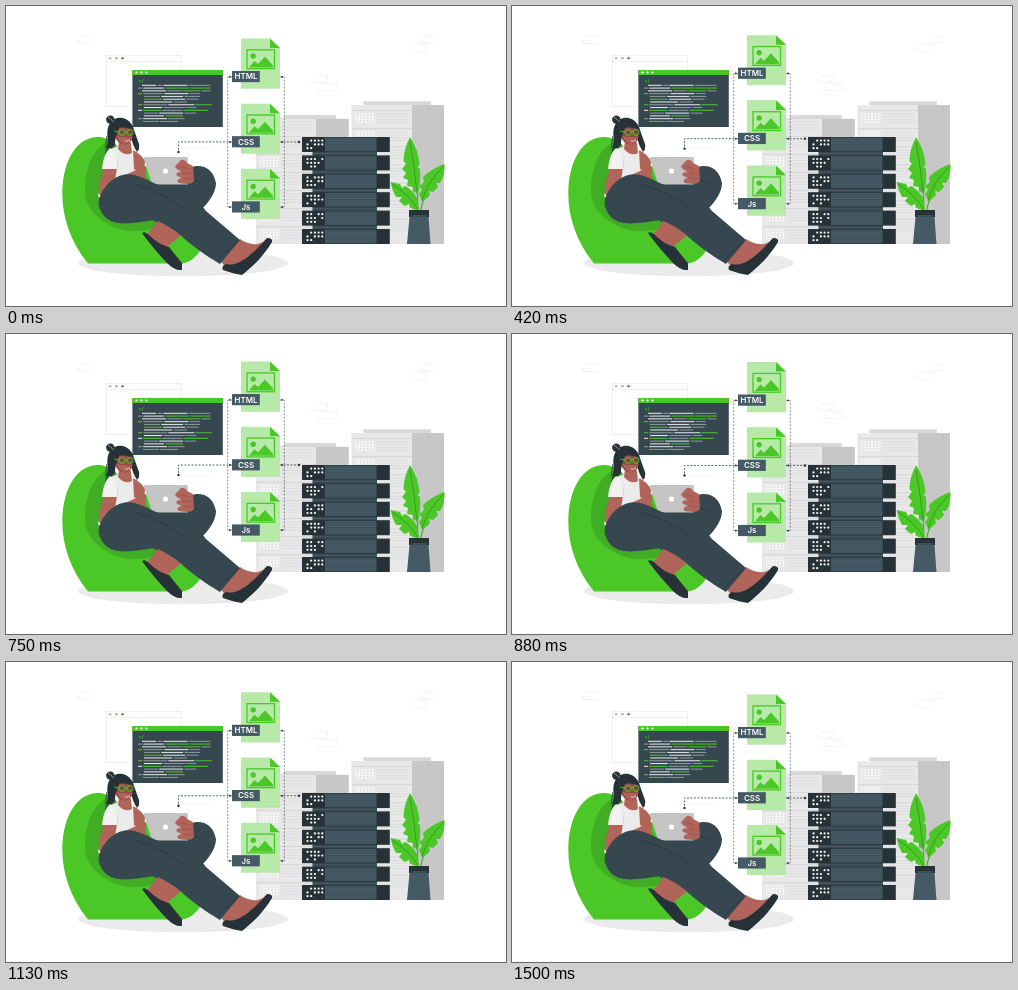
These frames come from a looping animation (500 px wide and 300 px high, 1540 ms). An HTML page with a canvas:

```html
<!DOCTYPE html>
<html lang="en">
<head>
<meta charset="utf-8">
<title>Web files</title>
<style>
html, body { margin: 0; width: 100%; height: 100%; overflow: hidden; background: #fff; }
canvas { display: block; width: 500px; height: 300px; }
</style>
</head>
<body>
<canvas id="stage"></canvas>
<script>
const LOOP = 1540;
const GREEN = '#4bc828', LEAF_DARK = '#40ad24', PALE = '#b7e9a9';
const INK = '#263238', NAVY = '#37474f', SLATE = '#455a64';
const SKIN = '#b16459', SKIN_DARK = '#8f4b44';

const canvas = document.getElementById('stage');
const ctx = canvas.getContext('2d');
const ratio = window.devicePixelRatio || 1;
canvas.width = 500 * ratio;
canvas.height = 300 * ratio;

function rect(x, y, w, h, color) {
  ctx.fillStyle = color;
  ctx.fillRect(x, y, w, h);
}
function frame(x, y, w, h, color, width = 0.6) {
  ctx.strokeStyle = color;
  ctx.lineWidth = width;
  ctx.strokeRect(x, y, w, h);
}
function dot(x, y, r, color) {
  ctx.fillStyle = color;
  ctx.beginPath();
  ctx.arc(x, y, r, 0, Math.PI * 2);
  ctx.fill();
}
function oval(x, y, rx, ry, color) {
  ctx.fillStyle = color;
  ctx.beginPath();
  ctx.ellipse(x, y, rx, ry, 0, 0, Math.PI * 2);
  ctx.fill();
}
function shape(path, color) {
  ctx.fillStyle = color;
  ctx.fill(new Path2D(path));
}
function line(path, color, width = 0.6, dash = []) {
  ctx.strokeStyle = color;
  ctx.lineWidth = width;
  ctx.setLineDash(dash);
  ctx.stroke(new Path2D(path));
  ctx.setLineDash([]);
}

function drawBackdrop() {
  const faint = '#ececec';
  line('M74 30.5H86.5V37.5H71V34.5H75', faint);
  line('M418 30.5H430V37H415V34H419 M407 38H420V45H404V42H408', faint);
  line('M309 69.5H321.5V76H306V73 M315 77.5H331V84.5H312V80.5', faint);
  frame(176, 135, 29.5, 7, '#ededed');
  oval(177, 257, 105, 13.3, '#ebebeb');
}

function drawWindows() {
  frame(100.3, 49.3, 75.3, 51.5, '#e5e5e5');
  line('M100 55.5H176', '#e5e5e5');
  ['#b9b9b9', '#a8b2a6', '#4f9b42'].forEach((c, i) => dot(104.2 + i * 6.2, 52.3, 1.3, c));

  rect(126.4, 64, 90.4, 57, NAVY);
  rect(126.4, 64, 90.4, 5, GREEN);
  for (let i = 0; i < 3; i++) dot(130.5 + i * 5, 66.5, 1.1, '#fff');
  ctx.fillStyle = GREEN;
  ctx.font = '600 4.5px "Noto Sans Mono", monospace';
  ctx.textAlign = 'left';
  ctx.fillText('</', 132.5, 76.7);

  // Each row: start x, then widths and ink letters of its words.
  const rows = [
    [136, '14w 5e 24w 22e'], [132, '4e 21w 24g 20g'], [136, '24w 14e 18g 9e'],
    [132, '4g 20e 24w 10e'], [138, '16e 22w 16e'], [138, '18g 22w 12e'],
    [138, '28w 14e'], [132, '4g 24e 26w 16g'], [138, '18w 22e 10g'],
    [132, '4w 18g 20e 24g'], [138, '14e 24w 12e'], [138, '20w 18g'],
    [132, '4e 24w 16e'], [137, '16g 18e']
  ];
  const inks = { w: '#e8ebec', e: '#8e9a9f', g: GREEN };
  rows.forEach(([x, words], i) => {
    for (const word of words.split(' ')) {
      const w = parseInt(word);
      rect(x, 78.8 + i * 2.78, w, 1, inks[word.at(-1)]);
      x += w + 1.2;
    }
  });
}

function dotGrid(x, y) {
  rect(x, y, 18, 9, '#f7f7f7');
  for (let c = 0; c < 5; c++)
    for (let r = 0; r < 3; r++) dot(x + 2 + c * 3.4, y + 1.8 + r * 2.7, 0.95, '#d9d9d9');
}

function lightServer(x, y, front, side, rowY) {
  rect(x, y, front, 238 - y, '#e8e8e8');
  rect(x + front, y, side, 238 - y, '#c7c7c7');
  for (let top = rowY; top < 228; top += 18.1) {
    line(`M${x} ${top - 3}h${front}`, '#d3d3d3', 0.9);
    dotGrid(x + 4, top);
    for (let i = 0; i < 4; i++)
      line(`M${x + 25} ${top + 0.5 + i * 2.7}h${front - 29}`, '#d6d6d6', 0.6);
  }
}

function drawServers() {
  rect(357.5, 95.3, 67.5, 4, '#d9d9d9');
  lightServer(345.5, 99, 60.5, 32, 107.5);
  rect(278, 109, 52, 4, '#d9d9d9');
  lightServer(250, 112.8, 60, 32.8, 115.2);

  rect(306.5, 131, 64.5, 106.5, NAVY);
  for (let i = 0; i < 6; i++) {
    const y = 131 + i * 18.4;
    rect(296, y, 87.8, 15, INK);
    rect(319, y + 0.7, 51.5, 13.6, SLATE);
    for (let k = 0; k < 5; k++) line(`M320 ${y + 2.2 + k * 2.6}h50`, '#3a4d56', 0.6);
    for (let k = 0; k < 13; k++) {
      const col = k % 5, row = Math.floor(k / 5);
      if ((col * 3 + row * 2 + i) % 5) dot(301.5 + col * 3.7, y + 3.6 + row * 3.8, 1.1, '#fff');
    }
    if (i < 5) line(`M307 ${y + 16.7}h64`, '#596b73', 0.6);
  }
}

function drawPlant() {
  line('M412 207Q412 170 405 140 M414 207Q417 190 431 168 M412 207Q407 192 390 183', LEAF_DARK, 1.2);
  shape('M404 131C409 139 413 148 413.5 158L411.5 161L414 163Q415 178 412 188L407 185L407 181L401 180L402 174L397 172L400 167L396 163L400 158L397.5 155Q398 142 404 131Z', GREEN);
  shape('M438.5 158C439 166 437 173 434 177L430 177L432 181L427 186L423 185L424 189Q420 194 416 195L413 188L416 184L413.5 180L418 176L417 171Q426 162 438.5 158Z', GREEN);
  shape('M384.5 176L394 178L396 182L399 180Q407 184 411 192Q413 199 412 204L404 202L403 198L399 200L393 195L396 191L390 191Q386 184 384.5 176Z', GREEN);
  line('M404 136Q409 163 411 187 M437 161Q421 176 416 195 M386 178Q401 187 412 203', '#2f8a1a', 0.7);
  shape('M403.5 211H422.5L424.5 238H401Z', SLATE);
  rect(403, 204, 20, 7, INK);
  rect(405, 209.3, 16, 1.4, SLATE);
}

function drawSeat() {
  shape('M82 257.5C65 237 56 211 56.3 187C57 152 72 131 92 131C104 131 110 139 116 147L181 184C202 207 203 233 198 239Q187 258 174 257.5Z', GREEN);
  shape('M106 134C91 138 80 156 79 181C78 202 91 214 111 222C128 229 153 224 169 213L140 170L116 146Z', LEAF_DARK);
}

function drawBackLeg() {
  shape('M139 180C159 176 177 163 190 160Q206 159 210 177C210 188 201 198 194 205L166 228L147 214Z', NAVY);
  line('M188 174Q198 177 205 186', INK, 0.6);
  shape('M152 214L177 228L162 240L172 253Q160 249 141 229Z', SKIN);
  shape('M136 227Q139 225 143 229C150 236 156 239 163 241Q170 250 176 257L176 264Q169 265 161 257Q146 241 136 227Z', INK);
}

function drawFrontLeg() {
  shape('M214 254L234 233Q242 239 252 238L260 235L236 265L220 262Z', SKIN);
  shape('M261 232Q267 232 266 236C257 251 246 261 236 269Q228 268 217 264Q215 260 220 258C234 262 250 244 261 232Z', INK);
  shape('M93 193C97 181 107 170 119 168.5C132 167 143 176 153 179H182Q191 194 200 205L234 234L214 258Q190 244 172 227Q160 218 149 214C131 216 110 222 99 211Q91 202 93 193Z', NAVY);
  line('M127 178Q151 183 177 202 M231 236L211 255', INK, 0.6);
}

function drawBody() {
  shape('M101 146Q112 137 122 142L130 147Q137 152 138 161L130 181L98 196L92 190Q95 179 97 171Z', '#ebebeb');
  shape('M113 135L125 137L126 147Q119 151 112 143Z', SKIN);
  shape('M127 144Q135 148 139 155L138 168L128 163Z', SKIN);
  shape('M98 163L111 162L109 174L132 163L140 160V178L104 190Q96 192 93 188Q93 174 98 163Z', SKIN);
  shape('M104 142Q110 146 111 153L112 163L96 163Q97 149 104 142Z', '#f2f2f2');
  line('M111 153Q111 158 112 163', '#c6c6c6', 0.6);
  line('M109 174L104 180', SKIN_DARK, 0.6);
}

function drawHead() {
  dot(104.3, 113.6, 4.2, INK);
  shape('M118 116Q126 116 128 124L133 138Q134 143 131 146Q127 140 125 132Z', INK);
  shape('M109 120Q119 116 125 122L126.5 131Q125 138.5 119 138.5Q111 138 109 130Z', SKIN_DARK);
  shape('M111 130Q118 132 126 131Q124 138 119 138Q113 137 111 130Z', SKIN);
  shape('M100 142C104 136 99 127 103 119C107 110 120 109 126 119L127 124Q118 120 113 122Q109 130 109 139Q105 144 100 142Z', INK);
  line('M104 135Q103 144 99 147 M101 130Q99 138 100 145', INK, 0.8);
  line('M101 110L108 116', '#eee', 0.5);
  ctx.strokeStyle = GREEN;
  ctx.lineWidth = 1;
  for (const x of [116, 124]) {
    ctx.beginPath();
    ctx.arc(x, 126.3, 3, 0, Math.PI * 2);
    ctx.stroke();
  }
  line('M108 125L113 126 M119 126H121', GREEN, 0.9);
  dot(116.5, 126.3, 0.6, INK);
  dot(124, 126.3, 0.6, INK);
  line('M119 134.5Q122 136 124 134', '#f4e4df', 0.7);
}

function drawLaptop() {
  shape('M139 151H180.5Q182 151 182 153V178.5H149Q146 178 145 175L138 153Q138 151 139 151Z', '#c4c4c4');
  dot(159.5, 165, 2.6, '#fff');
}

function drawHand() {
  shape('M170 159L175 154Q179 153 181 157L187 160L188 174Q187 178 181 178L173 177Q170 175 173 173L177 172L171 170Q169 167 173 166L177 167L171 163Q168 161 170 159Z', SKIN);
  line('M173 160L183 163 M174 166L187 168 M174 172L187 173', SKIN_DARK, 0.6);
}

function drawFile(y, label) {
  shape(`M235 ${y}H264L274 ${y + 9.6}V${y + 50.2}H235Z`, PALE);
  shape(`M264 ${y}L274 ${y + 9.6}H264Z`, GREEN);
  frame(241, y + 11.4, 27.5, 18.8, GREEN, 1.3);
  dot(247.2, y + 17.6, 2.7, GREEN);
  shape(`M243 ${y + 29}L248.5 ${y + 22.5}L252 ${y + 25.5}L259 ${y + 18}L267 ${y + 27}V${y + 29}Z`, GREEN);
  rect(226, y + 32.5, 27.8, 11.2, SLATE);
  ctx.fillStyle = '#fff';
  ctx.font = '600 7.9px Inter, sans-serif';
  ctx.textAlign = 'center';
  ctx.fillText(label, 240, y + 41);
}

function drawFiles(lift) {
  ctx.save();
  ctx.translate(0, -lift);
  line('M226 71H221.7V201H226 M274 71H278.3V201H274', NAVY, 0.6, [2, 1.5]);
  line('M226 136H172.5V146 M274 136H293', NAVY, 0.8, [2, 1.5]);
  ['HTML', 'CSS', 'Js'].forEach((label, i) => {
    const y = 32.5 + i * 65.2;
    drawFile(y, label);
    dot(223.8, y + 38.3, 0.9, INK);
    dot(276.2, y + 38.3, 0.9, INK);
  });
  dot(172.5, 146, 1.2, INK);
  dot(293, 136, 1.2, INK);
  ctx.restore();
}

function draw(now) {
  const phase = ((now % LOOP) + 50) / LOOP * Math.PI * 2;
  const lift = 2.5 * (1 - Math.cos(phase));
  ctx.setTransform(ratio, 0, 0, ratio, 0, 0);
  rect(0, 0, 500, 300, '#fff');
  drawBackdrop();
  drawWindows();
  drawServers();
  drawPlant();
  drawSeat();
  drawBackLeg();
  drawBody();
  drawHead();
  drawLaptop();
  drawFrontLeg();
  drawHand();
  drawFiles(lift);
}

const start = performance.now();
function tick() {
  draw(performance.now() - start);
  requestAnimationFrame(tick);
}
tick();
</script>
</body>
</html>
```
